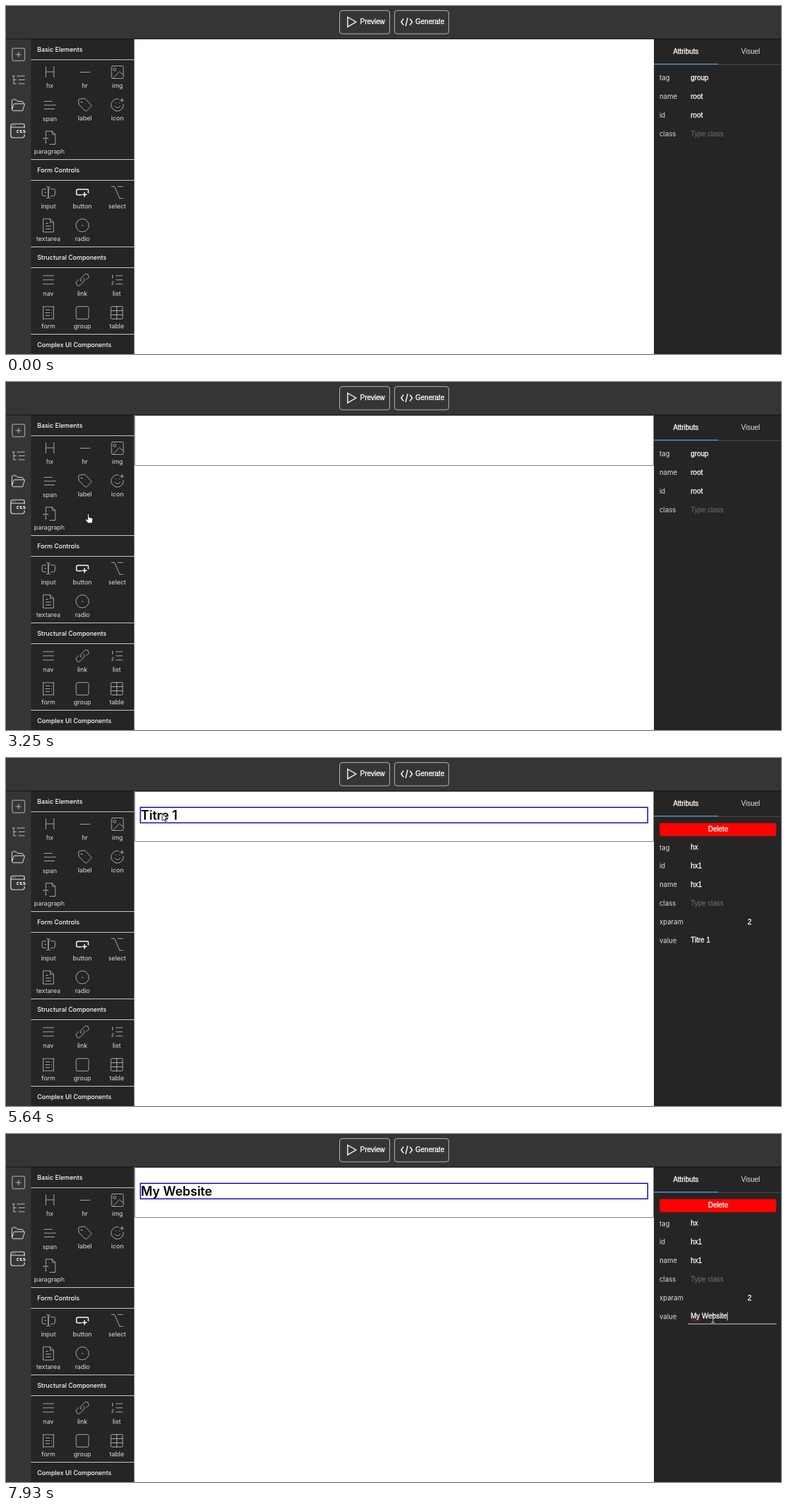
An HTML page with a canvas for the animation above (8 s loop, 1116 by 502 pixels).

```html
<!DOCTYPE html>
<html lang="en">
<head>
<meta charset="utf-8">
<title>Page builder</title>
<style>
html, body { margin: 0; width: 100%; height: 100%; overflow: hidden; background: #252525; }
canvas { display: block; }
</style>
</head>
<body>
<canvas id="stage" width="1116" height="502"></canvas>
<script>
const ctx = document.getElementById('stage').getContext('2d');
const LOOP = 8000;
const UI = '"Liberation Sans", Arial, sans-serif';
const BRAND = 'Inter, sans-serif';
const DOC = 'M-7.5 -9.5H2.5L7.5 -4.5V9.5H-7.5ZM2.5 -9.5V-4.5H7.5';

// label, centre x, icon centre y, icon path, line width
const ITEMS = [
  ['hx', 63, 95, 'M-5.5 -8V8M6 -8V8M-5.5 0H6'],
  ['hr', 113.5, 95.5, 'M-7.5 0H7.5'],
  ['img', 160.5, 95.5, 'M-6.5 -9H6.5Q8.5 -9 8.5 -7V7Q8.5 9 6.5 9H-6.5Q-8.5 9 -8.5 7V-7Q-8.5 -9 -6.5 -9ZM-2 -4A2 2 0 1 1 -6 -4A2 2 0 1 1 -2 -4M-6.5 9L3 -1L8.5 4'],
  ['span', 63, 143, 'M-8.5 -5.5H4M-8.5 0H9M-8.5 5.5H7'],
  ['label', 113.5, 142.5, 'M-9 -6.5Q-9 -8.5 -7 -8.5L0 -9L9 0Q10 1 9 2L3 8.5Q1.5 9.5 0.5 8.5L-8.5 0ZM-4 -4A.7 .7 0 1 1 -5.4 -4A.7 .7 0 1 1 -4 -4'],
  ['icon', 160.5, 142.5, 'M2 -8.3A8.8 8.8 0 1 0 8.5 -1M-4 2Q0 6.5 4 2M-3 -3V-2M3 -3V-2M6.5 -9.5V-3.5M3.5 -6.5H9.5'],
  ['paragraph', 62.5, 190, 'M-5 -1V-9.5H4L8.5 -5V9.5H0M4 -9.5V-5H8.5M-8.5 2V0.5H-2V2M-5.2 .5V7M-6.5 7H-4'],
  ['input', 61, 269, 'M-3 -5H-7Q-9 -5 -9 -3V3Q-9 5 -7 5H-3M3 -5H7.5Q9.5 -5 9.5 -3V3Q9.5 5 7.5 5H3M-3 -8.5Q0 -8.5 0 -6V6Q0 8.5 -3 8.5M3 -8.5Q0 -8.5 0 -6V6Q0 8.5 3 8.5M-6 0H-3'],
  ['button', 110, 269, 'M-1 3.5H-7Q-8.5 3.5 -8.5 2V-3Q-8.5 -4.5 -7 -4.5H7Q8.5 -4.5 8.5 -3V1M3 -.5V6.5M-.5 3H6.5', 1.5],
  ['select', 160, 269, 'M-8.5 -8.5H-3.5L3.5 8.5H8.5M1 -8.5H8.5'],
  ['textarea', 61, 316.5, DOC + 'M-4 -3H0M-4 1H4M-4 5H4'],
  ['radio', 110, 316.5, 'M9.3 0A9.3 9.3 0 1 1 -9.3 0A9.3 9.3 0 1 1 9.3 0M-.7 0H.7M0 -.7V.7'],
  ['nav', 61, 395, 'M-8 -6H8M-8 0H8M-8 6H8'],
  ['link', 110, 395, 'M-2 2.5Q-4 -.5 -1 -3.5L3 -7.5Q5.5 -10 8 -7.5Q10.5 -5 8 -2.5L5 .5M2 -2.5Q4 .5 1 3.5L-3 7.5Q-5.5 10 -8 7.5Q-10.5 5 -8 2.5L-5 -.5'],
  ['list', 159.5, 395, 'M-1.5 -6H8.5M-1.5 0H8.5M-1.5 6H8.5M-7 -6L-6 -7V-2M-7.5 3Q-5.5 1.5 -5 3Q-5 4.5 -7.5 6.5H-5'],
  ['form', 61, 442.5, 'M-7.5 9.5V-9.5L-5 -8L-2.5 -9.5L0 -8L2.5 -9.5L5 -8L7.5 -9.5V9.5L5 8L2.5 9.5L0 8L-2.5 9.5L-5 8ZM-4.5 -4H2M-4.5 0H2M-4.5 4H2M4 -4H5M4 0H5M4 4H5'],
  ['group', 110, 442.5, 'M-7 -9H7Q9 -9 9 -7V7Q9 9 7 9H-7Q-9 9 -9 7V-7Q-9 -9 -7 -9Z'],
  ['table', 159.5, 442.5, 'M-6.5 -9H6.5Q8.5 -9 8.5 -7V7Q8.5 9 6.5 9H-6.5Q-8.5 9 -8.5 7V-7Q-8.5 -9 -6.5 -9ZM-8.5 -3H8.5M-8.5 3H8.5M0 -9V9'],
].map(([label, x, y, path, width]) => ({ label, x, y, path: new Path2D(path), width }));

const STRIP = [
  [18, 70, 'M-7 -9H7Q9 -9 9 -7V7Q9 9 7 9H-7Q-9 9 -9 7V-7Q-9 -9 -7 -9ZM-4 0H4M0 -4V4', 0.8],
  [18, 106.5, 'M-9 -5.5H-5M-2.5 -5.5H9M-7 -5.5V5.5H-3M-7 0H-3M0 0H9M0 5.5H9', 0.8],
  [17.5, 143, 'M-9 7V-6Q-9 -8 -7 -8H-3L-1 -5.5H5Q7 -5.5 7 -3.5V-2M-9 7L-6 -2H9.5L6.5 8H-8Z', 1],
  [17, 180, 'M9.5 -4V-7.5Q9.5 -10 7 -10H-7Q-10 -10 -10 -7.5V7Q-10 10 -7 10H6Q9.5 10 9.5 6.5V5M-10 -5H9.5M-7.5 -7.5H-6.5M-4.5 -7.5H-3.5', 1.2],
].map(([x, y, path, width]) => ({ x, y, path: new Path2D(path), width }));

const ARROW = new Path2D('M0 0V10.5L2.5 8.3L4.2 12L5.8 11.2L4.2 7.7H7.5Z');
const HAND = new Path2D('M-1 0Q0 -1 1 0V4.5L5 5.5Q6.5 6 6.3 8L5.3 13H-.5L-4 8.5Q-4 6.5 -2.5 7L-1 8.5Z');
const PLAY = new Path2D('M-5.5 -7L6.5 0L-5.5 7Z');
const CODE = new Path2D('M-4.5 -4.5L-8 0L-4.5 4.5M4.5 -4.5L8 0L4.5 4.5M1.5 -6L-1.5 6');

// pointer route: time, x, y
const ROUTE = [
  [30, 375, 187], [740, 109, 447], [860, 109, 449], [1460, 239, 221.5], [1660, 252, 193],
  [1760, 253, 191], [2150, 273, 125], [2490, 268, 72], [2650, 268, 72], [3350, 93, 211],
  [3450, 92, 206], [4050, 78, 97], [4350, 78, 97], [4920, 226, 74], [5110, 226, 79],
  [5640, 225, 80], [5970, 945, 235], [6070, 960, 245], [6500, 1008, 276], [6870, 1017.5, 267],
];
// runs of evenly spaced updates: first time, last time, count
const RUNS = [[0, 0, 2], [30, 760, 9], [860, 1660, 9], [1760, 2490, 9], [2590, 3350, 10],
  [3450, 4250, 9], [4350, 5110, 10], [5210, 5970, 10], [6070, 6870, 9], [6970, 7710, 10], [7780, 7930, 6]];

const within = (t, from, to) => t >= from && t < to;

function stepTime(t) {
  const [first, last, count] = RUNS.findLast(run => run[0] <= t);
  if (t >= last) return last;
  const step = (last - first) / (count - 1);
  return first + Math.floor((t - first) / step + 1e-6) * step;
}

function pointerAt(t) {
  const next = ROUTE.findIndex(p => p[0] > t);
  if (next < 0) return ROUTE[ROUTE.length - 1].slice(1);
  if (next === 0) return ROUTE[0].slice(1);
  const [t0, x0, y0] = ROUTE[next - 1], [t1, x1, y1] = ROUTE[next];
  const u = (t - t0) / (t1 - t0), e = u * u * (3 - 2 * u);
  return [x0 + (x1 - x0) * e, y0 + (y1 - y0) * e];
}

function fill(color, x, y, w, h, radius = 0) {
  ctx.fillStyle = color;
  ctx.beginPath();
  ctx.roundRect(x, y, w, h, radius);
  ctx.fill();
}

function frame(color, x, y, w, h, width = 1, radius = 0) {
  ctx.strokeStyle = color;
  ctx.lineWidth = width;
  ctx.beginPath();
  ctx.roundRect(x, y, w, h, radius);
  ctx.stroke();
}

function text(value, x, baseline, { size = 10, family = UI, color = '#fff', align = 'left', weight = 400 } = {}) {
  ctx.font = `${weight} ${size}px ${family}`;
  ctx.textAlign = align;
  ctx.fillStyle = color;
  ctx.fillText(value, x, baseline);
  if (family !== UI || color !== '#fff') return;
  // slightly heavier form text
  ctx.strokeStyle = color;
  ctx.lineWidth = 0.3;
  ctx.strokeText(value, x, baseline);
}

function drawPath(path, x, y, { stroke, width = 1, color }) {
  ctx.save();
  ctx.translate(x, y);
  if (color) { ctx.fillStyle = color; ctx.fill(path); }
  ctx.strokeStyle = stroke;
  ctx.lineWidth = width;
  ctx.stroke(path);
  ctx.restore();
}

function drawTopBar() {
  fill('#373533', 0, 0, 1116, 48);
  fill('#0c0c0c', 0, 47.25, 1116, 0.75);
  frame('#d8d8d8', 480.5, 6.6, 72, 33.5, 0.8, 3.5);
  frame('#d8d8d8', 559.6, 6.6, 78, 33.5, 0.8, 3.5);
  drawPath(PLAY, 497.5, 23, { stroke: '#fff', width: 1.4 });
  drawPath(CODE, 577, 23, { stroke: '#fff', width: 1.4 });
  text('Preview', 510, 26.3);
  text('Generate', 589.5, 26.3);
}

function drawStrip() {
  fill('#373533', 0, 48, 36, 454);
  for (const { x, y, path, width } of STRIP) drawPath(path, x, y, { stroke: '#e0e0e0', width });
  text('css', 14.8, 183.2, { size: 7.6, family: '"DejaVu Sans Mono", monospace', weight: 700 });
}

function drawPalette(t) {
  fill('#252525', 36, 48, 148.5, 454);
  if (within(t, 620, 2650)) fill('#363636', 91, 431, 38, 37, 1);
  if (within(t, 3950, 5000)) fill('#363636', 42, 84, 43, 36, 1);
  const titles = [['Basic Elements', 63], ['Form Controls', 237], ['Structural Components', 363], ['Complex UI Components', 489]];
  for (const [title, y] of titles) text(title, 45, y + 3.2, { size: 9, family: BRAND, weight: 500 });
  for (const y of [77, 221, 251, 347, 377, 473]) fill('#fff', 36, y + 0.25, 148.5, 0.75);
  for (const { label, x, y, path, width = 0.75 } of ITEMS) {
    drawPath(path, x, y, { stroke: width > 1 ? '#fff' : '#cfcfcf', width });
    text(label, x, Math.round(y + 22.6), { size: 9, family: BRAND, color: '#dedede', align: 'center' });
  }
}

function drawPage(t, heading) {
  fill('#fff', 184.5, 48, 748.5, 454);
  if (t >= 2650) frame('#858585', 185.5, 48.5, 747, 72);
  if (t >= 5000) text(heading, 194.3, 89, { size: 18, family: BRAND, weight: 600, color: '#000' });
  if (t >= 5210) frame('#0a0ac0', 193.5, 71.25, 730.5, 22.25, 1.5);
}

function drawRow(label, value, y, hint) {
  text(label, 941, y + 3.4, { size: 9.75, family: BRAND, color: '#dedede' });
  text(value, label === 'xparam' ? 1068 : 986, y + 3, { color: hint ? '#757575' : '#fff' });
}

function drawValueField(t, value) {
  const width = s => { ctx.font = `10px ${UI}`; return ctx.measureText(s).width; };
  if (t >= 6600) fill('#d0d0d0', 982, 273.5, 127.5, 1);
  if (within(t, 7050, 7456)) {
    const from = t < 7210 ? width('Titre ') : 0;
    fill('#0b57d0', 986 + from, 257, width(value) - from + 0.5, 12.5);
  }
  drawRow('value', value, 263.3);
  if (t < 7456) return;
  fill('#fff', 986 + width(value) + 0.3, 257.5, 0.9, 11.5);
  if (value.length < 3) return;
  ctx.strokeStyle = '#e02020';
  ctx.lineWidth = 0.9;
  ctx.beginPath();
  for (let x = 0; x <= 13.5; x += 0.5) ctx.lineTo(986.5 + x, 268.5 + 0.7 * Math.sin(x * 2));
  ctx.stroke();
}

function drawInspector(t, value) {
  fill('#252525', 933, 48, 183, 454);
  fill('#484848', 933, 84, 183, 1);
  fill('#4a87b5', 933, 83, 92.5, 1.5);
  text('Attributs', 979, 68.5, { align: 'center' });
  text('Visuel', 1072, 68.8, { align: 'center', color: '#e4e4e4' });
  if (t < 5210) {
    drawRow('tag', 'group', 104);
    drawRow('name', 'root', 131);
    drawRow('id', 'root', 157.5);
    drawRow('class', 'Type class', 184.5, true);
    return;
  }
  fill('#f00', 941.25, 93.75, 168, 19, 3);
  text('Delete', 1025.5, 106.3, { align: 'center' });
  drawRow('tag', 'hx', 129.3);
  drawRow('id', 'hx1', 156);
  drawRow('name', 'hx1', 183);
  drawRow('class', 'Type class', 209.8, true);
  drawRow('xparam', '2', 236.7);
  drawValueField(t, value);
}

function drawPointer(t) {
  const [x, y] = pointerAt(t);
  const dragging = within(t, 860, 2590) || within(t, 4350, 5000);
  const clicking = within(t, 5200, 5290) || within(t, 6970, 7100) || within(t, 7210, 7290);
  if (dragging || clicking) {
    ctx.fillStyle = 'rgba(255,250,0,.6)';
    ctx.beginPath();
    ctx.arc(x, y, 9, 0, 7);
    ctx.fill();
  }
  if (x > 982 && y > 225) {
    const px = Math.round(x);
    fill('#c8c8c8', px - 0.5, y - 5, 1, 10);
    fill('#c8c8c8', px - 2.5, y - 6, 5, 1);
    fill('#c8c8c8', px - 2.5, y + 4.5, 5, 1);
  } else if (x < 184 && !dragging) {
    drawPath(HAND, x, y, { stroke: '#111', width: 0.8, color: '#fff' });
  } else {
    drawPath(ARROW, x, y, { stroke: '#111', width: 0.9, color: '#fff' });
    if (dragging) {
      fill('#fff', x + 3.5, y + 9.5, 6, 6);
      frame('#333', x + 3.5, y + 9.5, 5, 5, 0.9);
      fill('#555', x + 7, y + 12, 4.5, 5);
    }
  }
}

function draw(time) {
  const t = stepTime(time % LOOP);
  const typed = t < 7780 ? Math.floor((t - 7375) / 82) : 5 + Math.floor((t - 7780) / 30 + 0.01);
  const value = typed > 0 ? 'My Website'.slice(0, typed) : 'Titre 1';
  drawPage(t, value);
  drawTopBar();
  drawStrip();
  drawPalette(t);
  drawInspector(t, value);
  if (t >= 30) drawPointer(t);
}

const began = performance.now();
function tick() {
  draw(performance.now() - began);
  requestAnimationFrame(tick);
}
tick();
</script>
</body>
</html>
```
